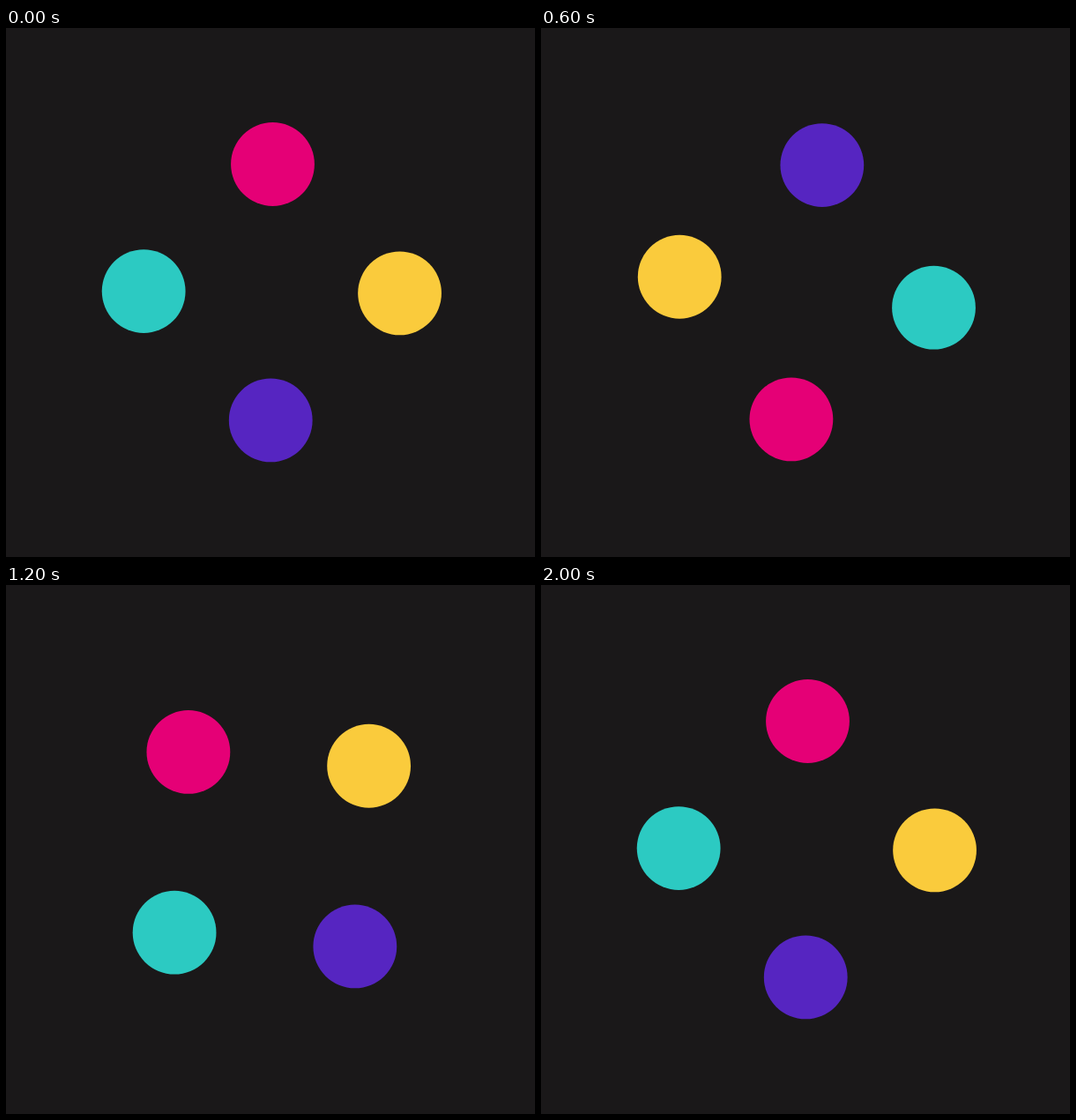
Recreate the animation shown at these times as an HTML page. Size 600 px wide and 600 px high, loop 2100 ms.

```html
<!DOCTYPE html>
<html lang="en">
<head>
<meta charset="utf-8">
<title>Spinning dots</title>
<style>
  html, body { margin: 0; width: 100%; height: 100%; overflow: hidden; background: #1a1819; }
  svg { display: block; width: 100%; height: 100%; }
  circle { filter: blur(.6px); }
</style>
</head>
<body>
<svg viewBox="0 0 600 600">
  <circle r="47.4" fill="#e50076"/>
  <circle r="47.4" fill="#facb3c"/>
  <circle r="47.4" fill="#5625c1"/>
  <circle r="47.4" fill="#2ccac2"/>
</svg>
<script>
const LOOP = 2100, STEP = 100, TURN = 2000, LEAD = 6;
const CX = 301.35, CY = 299.7, ORBIT = 145.2;
const dots = document.querySelectorAll('circle');

// CSS "ease": cubic-bezier(.25, .1, .25, 1), solved by bisection
const bezier = (a, b, s) => 3 * (1 - s) ** 2 * s * a + 3 * (1 - s) * s * s * b + s ** 3;
function ease(x) {
  let lo = 0, hi = 1;
  for (let i = 0; i < 30; i++) {
    const mid = (lo + hi) / 2;
    if (bezier(.25, .25, mid) < x) lo = mid; else hi = mid;
  }
  return bezier(.1, 1, lo);
}

function draw(ms) {
  const held = Math.floor((ms % LOOP) / STEP) * STEP;
  const turn = ease(((held + LEAD) % TURN) / TURN);
  dots.forEach((dot, i) => {
    const angle = (turn + i / 4) * 2 * Math.PI;
    dot.setAttribute('cx', CX + ORBIT * Math.sin(angle));
    dot.setAttribute('cy', CY - ORBIT * Math.cos(angle));
  });
}

const start = performance.now();
function tick() {
  draw(performance.now() - start);
  requestAnimationFrame(tick);
}
tick();
</script>
</body>
</html>
```
